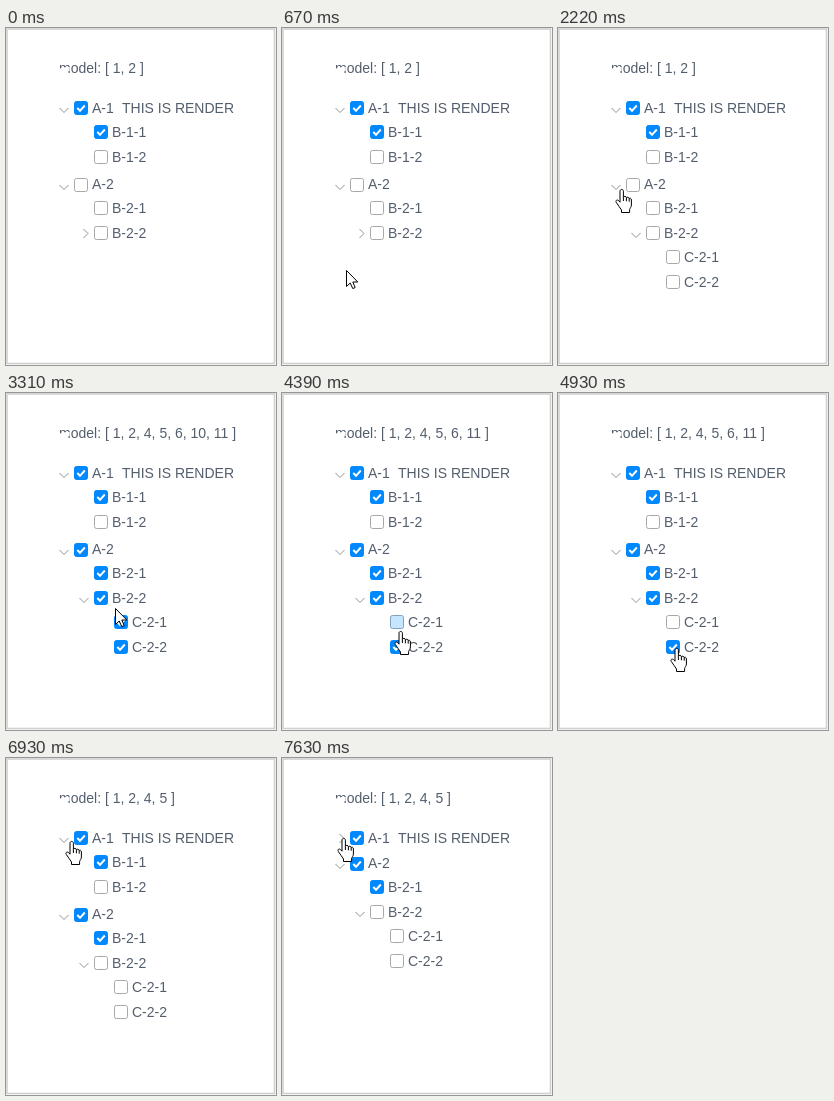
Animation, 270 px wide and 337 px high, one loop 8000 ms. Source, as an HTML page:

```html
<!DOCTYPE html>
<html lang="en">
<head>
<meta charset="utf-8">
<title>Checkbox tree</title>
<style>
  html, body { margin: 0; width: 100%; height: 100%; overflow: hidden; background: #fff; }
  svg { display: block; width: 270px; height: 337px; }
  text { font: 14px "Liberation Sans", Arial, sans-serif; fill: #535e6d; }
  .chevron { fill: none; stroke: #929292; stroke-width: 1; }
  .tick { fill: none; stroke: #fff; stroke-width: 2; }
  .cursor path { fill: #fff; stroke: #000; stroke-width: 1; stroke-linejoin: round; }
</style>
</head>
<body>
<svg id="stage" viewBox="0 0 270 337" xmlns="http://www.w3.org/2000/svg">
  <rect width="270" height="337" fill="#fff"/>
  <rect x="1" y="1" width="267.5" height="334.5" fill="none" stroke="#d0d0d0" stroke-width="1.6"/>
  <text id="model" x="53" y="45"></text>
  <path d="M52 41 60 39H63.6V43H61V46H52Z" fill="#fff"/>
  <g id="tree"></g>
  <g id="arrow" class="cursor"><path d="M.5 .5V16.5L4.2 13 6.8 18.6 9.2 17.5 6.8 12H11.8Z"/></g>
  <g id="hand" class="cursor">
    <path d="M-1 2.2C-1-.2 2.4-.2 2.4 2.2V8.3C3 6.8 5.2 7 5.4 8.8 6 7.8 8 8 8.2 9.6 8.8 8.8 10.4 9.2 10.4 11V16C10.4 18 9 19 8.6 20.5V23.5H.5V21C-1 19-2.5 16.5-4.6 13.6-6 11.6-3.8 10.2-2.4 11.6L-1 13.2Z"/>
    <path d="M2.4 8.3V12M5.4 8.8V12.3M8.2 9.6V12.7"/>
  </g>
</svg>
<script>
const LOOP = 8000, STEP = 77.2, ANCHOR = 990;
const EXPAND = 1180, CHECK_ALL = 2730, UNCHECK_FIRST = 4200, UNCHECK_SECOND = 5580, COLLAPSE = 7360;
const BLUE = [0, 136, 255], GREY = [168, 168, 168], WHITE = [255, 255, 255];
const $ = id => document.getElementById(id);

const rows = [
  { label: 'A-1', depth: 0, y: 80, checked: true, chevron: true },
  { label: 'B-1-1', depth: 1, y: 104, checked: true },
  { label: 'B-1-2', depth: 1, y: 129 },
  { label: 'A-2', depth: 0, y: 156.5, on: CHECK_ALL, chevron: true },
  { label: 'B-2-1', depth: 1, y: 180, on: CHECK_ALL },
  { label: 'B-2-2', depth: 1, y: 205, on: CHECK_ALL, off: UNCHECK_SECOND, chevron: true },
  { label: 'C-2-1', depth: 2, y: 229, on: CHECK_ALL, off: UNCHECK_FIRST },
  { label: 'C-2-2', depth: 2, y: 254, on: CHECK_ALL, off: UNCHECK_SECOND }
];

// time, x, y, pointing hand
const path = [
  [120, 43, 298, 0], [910, 78, 207, 0], [980, 80, 206, 1], [1690, 80, 206, 0],
  [2070, 61, 171, 0], [2140, 61, 165, 1], [2220, 63, 161, 1], [2450, 71, 158, 1],
  [3080, 71, 158, 0], [3310, 110, 216, 0], [3450, 121, 232, 1], [3540, 124, 235, 1],
  [3860, 124, 235, 1], [4010, 117, 231, 1], [4230, 117, 231, 1], [4390, 118, 238, 1],
  [4930, 118, 255, 1], [5690, 118, 255, 0], [5930, 111, 142, 0], [6390, 79, 93, 0],
  [6850, 66, 84, 1], [7160, 61, 80, 1]
];

const clamp = v => Math.min(1, Math.max(0, v));
const progress = (t, start, span) => clamp((t - start) / span);
const easeOut = p => p * (2 - p);
const mix = (a, b, p) => `rgb(${a.map((v, i) => Math.round(v + (b[i] - v) * p))})`;

function add(parent, tag, attrs, content = '') {
  const el = document.createElementNS('http://www.w3.org/2000/svg', tag);
  set(el, attrs);
  el.textContent = content;
  return parent.appendChild(el);
}

function set(el, attrs) {
  for (const name in attrs) el.setAttribute(name, attrs[name]);
}

for (const row of rows) {
  const x = 68 + row.depth * 20;
  row.group = add($('tree'), 'g', {});
  row.box = add(row.group, 'rect', { x: x + .5, width: 13, height: 13, rx: 2 });
  row.tick = add(row.group, 'path', { class: 'tick', d: 'M3.3 7 6 9.8 10.8 4.5' });
  row.text = add(row.group, 'text', { x: x + 18 }, row.label);
  row.x = x;
  if (row.chevron) {
    row.arrow = add(row.group, 'path', { class: 'chevron', d: 'M-.5-4.5 4 0-.5 4.5' });
  }
}
rows[0].note = add(rows[0].group, 'text', { x: 116 }, 'THIS IS RENDER');

function checkedAmount(row, t) {
  if (row.checked) return 1;
  if (row.off && t >= row.off) return 1 - progress(t, row.off, 240);
  return row.on ? progress(t, row.on, 240) : 0;
}

function drawRow(row, i, t, opened, closed) {
  let y = row.y, opacity = 1;
  const first = i === 1 || i === 6;
  if (i === 1 || i === 2) {
    y -= closed * (first ? 3 : 18);
    opacity = 1 - closed;
  } else if (i > 2) {
    y -= closed * 51;
  }
  if (row.depth === 2) {
    y -= (1 - opened) * (first ? 3 : 18);
    opacity = opened;
  }

  const top = Math.round(y - 7), baseline = Math.floor(y + 5);
  const amount = checkedAmount(row, t);
  const fading = row.off && t >= row.off;
  set(row.group, { opacity });
  set(row.box, { y: top + .5, fill: mix(WHITE, BLUE, amount), stroke: mix(GREY, BLUE, amount) });
  set(row.tick, { transform: `translate(${row.x} ${top})`, opacity: fading ? 0 : amount });
  set(row.text, { y: baseline });
  if (row.note) set(row.note, { y: baseline });
  if (row.arrow) {
    const turn = i === 0 ? 1 - closed : i === 5 ? opened : 1;
    set(row.arrow, { transform: `translate(${row.x - 10} ${Math.round(y) + .5}) rotate(${turn * 90})` });
  }
}

function drawCursor(t, visible) {
  let k = path.findIndex(key => key[0] > t) - 1;
  if (k === -2) k = path.length - 1;
  const a = path[Math.max(0, k)], b = path[Math.min(path.length - 1, k + 1)];
  const p = b[0] > a[0] ? progress(t, a[0], b[0] - a[0]) : 0;
  const at = n => Math.round(a[n] + (b[n] - a[n]) * p);
  const transform = `translate(${at(1)} ${at(2)})`;
  set($('arrow'), { transform, visibility: visible && !a[3] ? 'visible' : 'hidden' });
  set($('hand'), { transform, visibility: visible && a[3] ? 'visible' : 'hidden' });
}

function modelText(t) {
  let ids = '1, 2';
  if (t >= CHECK_ALL) ids = '1, 2, 4, 5, 6, 10, 11';
  if (t >= UNCHECK_FIRST) ids = '1, 2, 4, 5, 6, 11';
  if (t >= UNCHECK_SECOND) ids = '1, 2, 4, 5';
  return `model: [ ${ids} ]`;
}

function render(time) {
  // The screen refreshes in steps of about 13 per second.
  const t = ANCHOR + Math.floor((time - ANCHOR + 5) / STEP) * STEP;
  const opened = easeOut(progress(t, EXPAND, 265));
  const closed = easeOut(progress(t, COLLAPSE, 260));
  $('model').textContent = modelText(t);
  rows.forEach((row, i) => drawRow(row, i, t, opened, closed));
  drawCursor(t, time >= 120);
}

const began = performance.now();
function tick() {
  render((performance.now() - began) % LOOP);
  requestAnimationFrame(tick);
}
tick();
</script>
</body>
</html>
```
